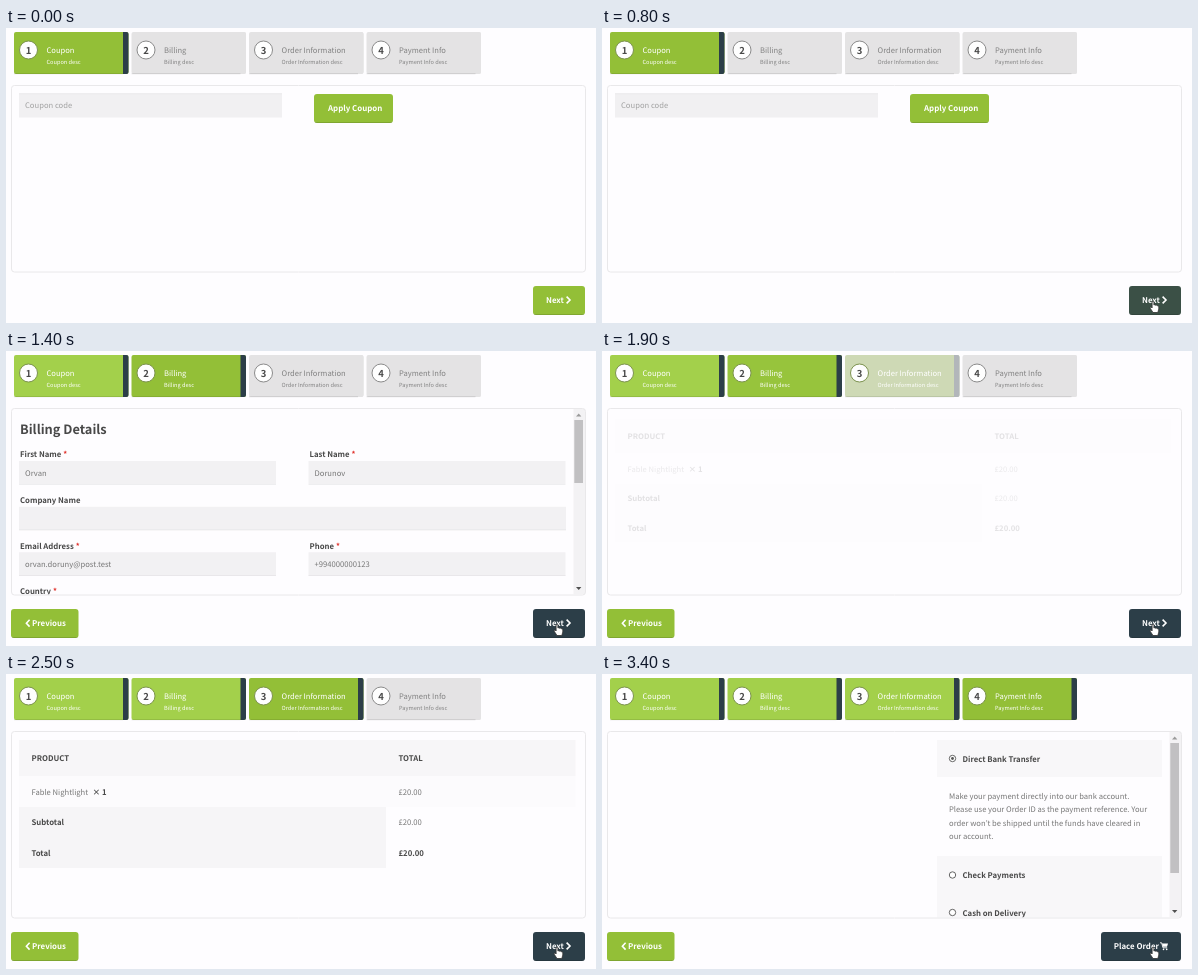
Animation of 590 by 295 pixels, one loop 4.1 s. Source, as an HTML page with a canvas:

```html
<!DOCTYPE html>
<html lang="en">
<head>
<meta charset="utf-8">
<title>Checkout steps</title>
<style>
  html, body { margin: 0; width: 100%; height: 100%; overflow: hidden; background: #fefdff; }
  canvas { display: block; }
</style>
</head>
<body>
<canvas id="stage" width="590" height="295"></canvas>
<script>
const ctx = document.getElementById('stage').getContext('2d');
const FONT = '"Noto Sans CJK JP", "Noto Sans CJK SC", "Noto Sans CJK", "Noto Sans", sans-serif';
const LOOP = 4100, TICK = 100;
const STARTS = [-1000, 800, 1800, 2700];   // when each step begins to open
const GREEN = [147, 191, 55], DONE = [163, 208, 75], DARK = [44, 62, 72], GREY = [228, 227, 228];
const INK = '#484848', SOFT = '#777';
const TABS = ['Coupon', 'Billing', 'Order Information', 'Payment Info'];

const clamp = v => Math.max(0, Math.min(1, v));
const swing = v => 0.5 - Math.cos(Math.PI * clamp(v)) / 2;
const mix = (a, b, k) => a.map((v, i) => v + (b[i] - v) * k);
const rgb = c => `rgb(${c.map(Math.round)})`;

function box(x, y, w, h, fill, radius = 0) {
  ctx.fillStyle = fill;
  ctx.beginPath();
  ctx.roundRect(x, y, w, h, radius);
  ctx.fill();
}

function text(str, x, y, color = SOFT, size = 7.65, weight = 400) {
  ctx.font = `${weight} ${size}px ${FONT}`;
  ctx.fillStyle = color;
  ctx.fillText(str, x, y);
  return ctx.measureText(str).width;
}

const bold = (str, x, y, color = INK, size = 7.75) => text(str, x, y, color, size, 700);

function line(points, color, width) {
  ctx.strokeStyle = color;
  ctx.lineWidth = width;
  ctx.beginPath();
  points.forEach(([x, y]) => ctx.lineTo(x, y));
  ctx.stroke();
}

function circle(x, y, r, fill, stroke, width = 1) {
  ctx.beginPath();
  ctx.arc(x, y, r, 0, 7);
  if (fill) { ctx.fillStyle = fill; ctx.fill(); }
  if (stroke) { ctx.strokeStyle = stroke; ctx.lineWidth = width; ctx.stroke(); }
}

function shape(path, x, y, fill, stroke) {
  const p = new Path2D(path);
  ctx.save();
  ctx.translate(x, y);
  ctx.fillStyle = fill;
  ctx.fill(p);
  ctx.strokeStyle = stroke;
  ctx.lineWidth = 0.8;
  ctx.stroke(p);
  ctx.restore();
}

function drawTab(i, t) {
  const x = 8 + i * 117.5;
  const open = clamp((t - STARTS[i]) / 370);
  const passed = i < 3 ? clamp((t - STARTS[i + 1]) / 370) : 0;
  const fill = mix(mix(GREY, GREEN, open), DONE, passed);
  box(x, 4, 114.5, 42, rgb(fill), 2);
  box(x + 109, 4, 5.5, 42, rgb(mix(GREY, DARK, open)), [0, 2, 2, 0]);
  box(x, 45.3, 109, 0.9, 'rgba(0,0,0,.12)');
  circle(x + 14.5, 22, 9, '#fefefe', open ? '#7d9350' : '#8b8b8b');
  ctx.textAlign = 'center';
  bold(i + 1, x + 14.5, 25.5, INK, 9.5);
  ctx.textAlign = 'left';
  const color = open ? '#fff' : '#828282';
  text(TABS[i], x + 32.5, 25, color, 7.6);
  text(TABS[i] + ' desc', x + 32.5, 36, color, 5.65);
}

function drawButton(x, y, w, label, labelX, fill) {
  box(x, y, w, 29, rgb(fill), 3);
  box(x + 1, y + 28.2, w - 2, 0.8, 'rgba(0,0,0,.18)');
  bold(label, labelX, y + 17.4, '#fff', 7.9);
}

function drawCart(x, y) {
  line([[x, y], [x + 1.6, y], [x + 3, y + 5], [x + 7.2, y + 5]], '#fff', 0.9);
  ctx.fillStyle = '#fff';
  ctx.fill(new Path2D(`M${x + 2} ${y + .7}h6l-1 3.3h-4.2z`));
  circle(x + 3.5, y + 6.6, 0.8, '#fff');
  circle(x + 6.7, y + 6.6, 0.8, '#fff');
}

function drawScrollbar(thumbHeight) {
  box(567.5, 58, 11.5, 185.5, '#f3f2f4');
  box(568.3, 69, 8.7, thumbHeight, '#c1c0c2');
  ctx.fillStyle = '#9a9a9a';
  ctx.fill(new Path2D('M570 65.5l2.7-3 2.7 3z'));
  ctx.fillStyle = '#505050';
  ctx.fill(new Path2D('M570 236l2.7 3 2.7-3z'));
}

function field(label, value, x, labelY, w = 257, required = true) {
  const width = bold(label, x + 1, labelY);
  if (required) bold('*', x + 3 + width, labelY, '#e0302a');
  box(x, labelY + 3.7, w, 23.6, '#f2f1f3');
  box(x, labelY + 26.6, w, 0.7, '#e6e5e7');
  text(value, x + 6, labelY + 18.4);
}

function coupon() {
  box(13, 65.5, 263, 24, '#f1f0f2');
  box(13, 65.5, 263, 0.7, '#e6e5e7');
  text('Coupon code', 19, 80.4, '#a2a2a2');
  drawButton(308, 66, 79, 'Apply Coupon', 322, GREEN);
}

function billing() {
  bold('Billing Details', 14, 83.3, INK, 12.8);
  field('First Name', 'Orvan', 13, 106.3);
  field('Last Name', 'Dorunov', 302.5, 106.3);
  field('Company Name', '', 13, 152, 547, false);
  field('Email Address', 'orvan.doruny@post.test', 13, 197.6);
  field('Phone', '+994000000123', 302.5, 197.6);
  field('Country', '', 13, 243, 547);
}

function order() {
  box(13, 66, 556.5, 36, '#f7f6f8');
  box(13, 102, 556.5, 31, '#fcfbfd');
  box(13, 133, 367, 61, '#f6f5f7');
  bold('PRODUCT', 25.5, 87.2);
  bold('TOTAL', 392.5, 87.2);
  text('Fable Nightlight', 25.5, 120.8);
  bold('× 1', 86.5, 120.8);
  text('£20.00', 392.5, 120.8);
  bold('Subtotal', 25.5, 151);
  text('£20.00', 392.5, 151);
  bold('Total', 25.5, 181.7);
  bold('£20.00', 392.5, 181.7);
}

function payment() {
  box(335, 66, 225, 37, '#f8f7f9');
  box(335, 182, 225, 68, '#f8f7f9');
  [['Direct Bank Transfer', 84.5], ['Check Payments', 201], ['Cash on Delivery', 238.5]].forEach(([label, y], i) => {
    circle(350.5, y, 3.2, '#fff', '#555', 0.9);
    if (i === 0) circle(350.5, y, 1.4, '#555');
    bold(label, 360.5, y + 3);
  });
  [
    'Make your payment directly into our bank account.',
    'Please use your Order ID as the payment reference. Your',
    'order won’t be shipped until the funds have cleared in',
    'our account.'
  ].forEach((row, i) => text(row, 347, 125 + i * 13.4));
}

const VIEWS = [
  { draw: coupon },
  { draw: billing, pivot: 84, thumb: 63 },
  { draw: order, pivot: 118 },
  { draw: payment, pivot: 84, thumb: 130 }
];

function drawPanel(step, t) {
  const { draw, pivot = 0, thumb } = VIEWS[step];
  const shown = swing((t - STARTS[step]) / 400);
  ctx.save();
  ctx.beginPath();
  ctx.rect(5.5, 57.5, 573.5, 186);
  ctx.clip();
  if (thumb) drawScrollbar(thumb);
  ctx.globalAlpha = shown;
  ctx.translate(0, pivot);
  ctx.scale(1, 1 - 0.04 * (1 - shown));
  ctx.translate(0, -pivot);
  draw();
  ctx.restore();
  ctx.strokeStyle = '#e9e8ea';
  ctx.lineWidth = 1;
  ctx.beginPath();
  ctx.roundRect(5.5, 57.5, 574, 186.5, 3);
  ctx.stroke();
}

function drawNavigation(step, t) {
  if (step > 0) {
    ctx.globalAlpha = swing((t - STARTS[1]) / 400);
    drawButton(5, 258, 67.5, 'Previous', 26, GREEN);
    line([[23.6, 268.8], [20.4, 272.2], [23.6, 275.6]], '#fff', 1.6);
    ctx.globalAlpha = 1;
  }
  if (step < 3) {
    drawButton(527, 258, 52, 'Next', 540, mix(GREEN, DARK, clamp((t - 500) / 350)));
    line([[560.6, 268.6], [564, 272], [560.6, 275.4]], '#fff', 1.6);
  } else {
    drawButton(499, 258, 80, 'Place Order', 511.7, mix(GREEN, DARK, clamp((t - 2700) / 330)));
    drawCart(558, 268.8);
  }
}

function drawCursor(t) {
  if (t < 300) return;
  const k = clamp((t - 300) / 500);
  const x = 566 - 15 * k, y = 252 + 21 * k;
  if (y < 258) {
    shape('M0 0v9l2-1.8 1.4 3 1.4-.7-1.4-2.8h2.8z', x, y, '#fff', '#333');
  } else {
    shape('M-.9 .8Q0-.6 .9 .8V4Q2 3.2 2.7 4.3 3.8 3.6 4.3 4.8 5.6 4.4 5.8 5.8V8L4.8 11.5H0L-2.8 7.2Q-3.2 5.8-1.9 6L-.9 7z', x, y, '#fff', '#333');
  }
}

function render(now) {
  const t = Math.floor(now % LOOP / TICK) * TICK;
  const step = STARTS.filter(start => t > start).length - 1;
  ctx.textRendering = 'geometricPrecision';
  box(0, 0, 590, 295, '#fefdff');
  TABS.forEach((_, i) => drawTab(i, t));
  drawPanel(step, t);
  drawNavigation(step, t);
  drawCursor(t);
}

let origin;
function loop(now) {
  origin ??= now;
  render(now - origin);
  requestAnimationFrame(loop);
}
requestAnimationFrame(loop);
</script>
</body>
</html>
```
